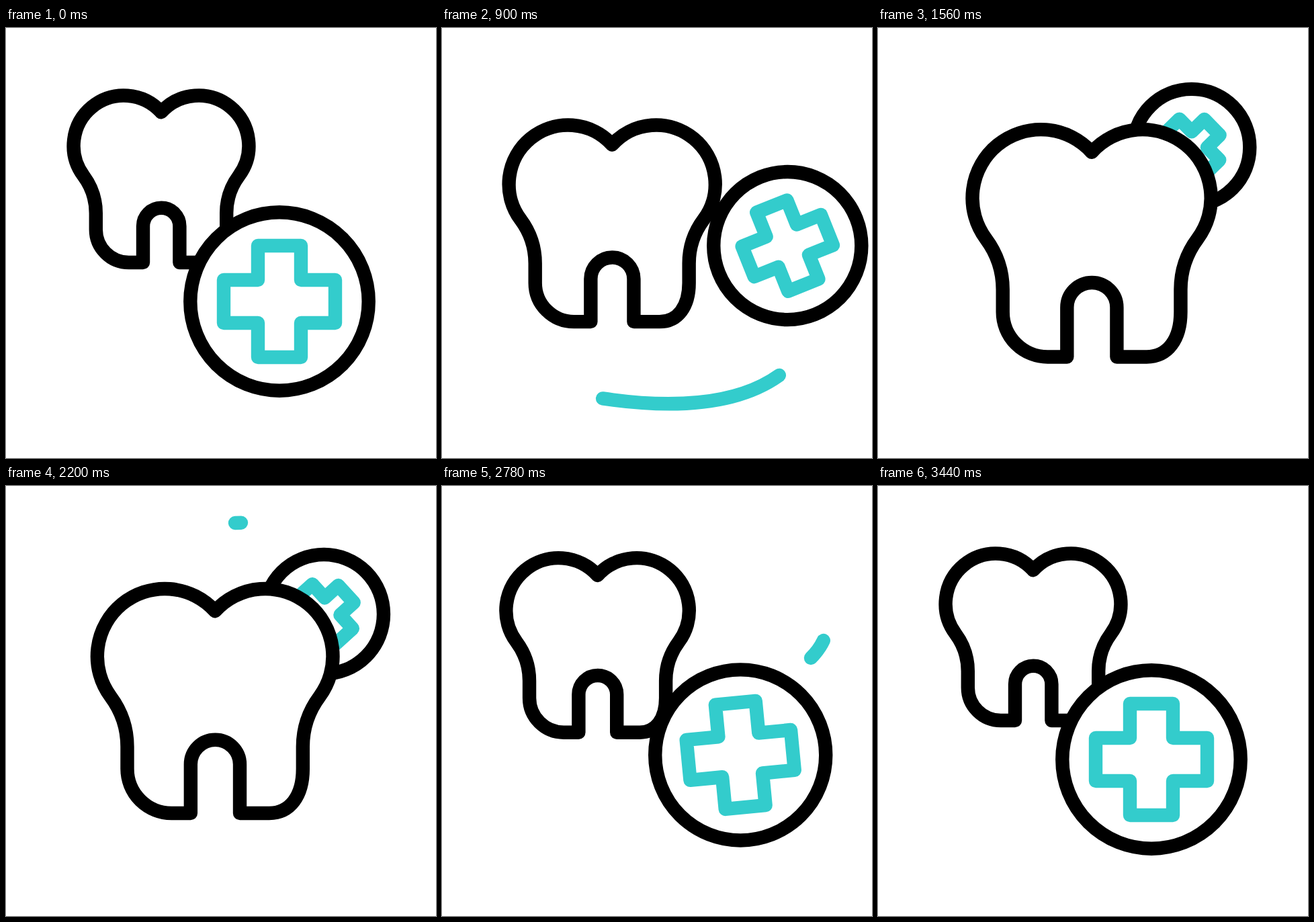
An HTML page for the animation above (3600 ms loop, 640 by 640 pixels).

```html
<!DOCTYPE html>
<html lang="en">
<head>
<meta charset="utf-8">
<title>Dental care</title>
<style>
@property --p { syntax: "<number>"; inherits: true; initial-value: 0; }
@property --lag { syntax: "<number>"; inherits: true; initial-value: 0; }
@property --front { syntax: "<number>"; inherits: true; initial-value: 1; }
@property --head { syntax: "<number>"; inherits: true; initial-value: 0; }
@property --tail { syntax: "<number>"; inherits: true; initial-value: 0; }

html, body { margin: 0; height: 100%; overflow: hidden; background: #fff; }

svg {
  display: block;
  width: 100%;
  height: 100%;
  --pen: 20.4px;
  stroke-linecap: round;
  stroke-linejoin: round;
  animation: swing 3600ms infinite, lag 3600ms step-end infinite, layer 3600ms step-end infinite;
}

/* --p runs 0 to 1 and back; every pose follows from it */
@keyframes swing {
  0% { --p: 0; }
  5% { --p: 0; animation-timing-function: cubic-bezier(.705, 0, .15, 1); }
  50.28% { --p: 1; animation-timing-function: cubic-bezier(.713, 0, .095, 1); }
  95.56%, 100% { --p: 0; }
}
@keyframes lag { 0% { --lag: 0; } 50.28%, 100% { --lag: .47; } }
@keyframes layer { 0% { --front: 1; } 25.5% { --front: 0; } 70.4%, 100% { --front: 1; } }

.move { offset-rotate: 0deg; }
.tooth.move {
  --r: calc(1 - var(--p));
  offset-path: path("M231 224.75 C231 284 270 320.3 320 320.3");
  offset-distance: calc(100% * var(--p) * (1 - var(--lag) * var(--r) * var(--r) * var(--r)));
}
.badge.move {
  offset-path: path("M407 407 C573 390 508 262 465 174");
  offset-distance: calc(100% * var(--p));
}
.front { opacity: var(--front); }
.back { opacity: calc(1 - var(--front)); }

/* shapes change size while the line weight stays */
.size {
  transform: rotate(calc(var(--turn, 0) * var(--p) * 1deg)) scale(var(--s));
  stroke-width: calc(var(--pen) / var(--s));
  stroke: #000;
  fill: #fff;
}
.molar { --s: calc(1 + .3665 * var(--p)); }
.disc { --s: calc(1 - .352 * var(--p)); }
.cross { --s: calc(1 - .493 * var(--p)); --turn: -45; stroke: #3cc; }

.trail {
  fill: none;
  stroke: #3cc;
  stroke-width: var(--pen);
  stroke-dasharray: calc((var(--head) - var(--tail)) * 1px) 300px;
  stroke-dashoffset: calc(var(--tail) * -1px);
  opacity: calc((var(--head) - var(--tail)) * 999);
  animation: 3600ms cubic-bezier(.7, 0, .3, 1) infinite;
}
.low { animation-name: low-head, low-tail; }
.high { animation-name: high-head, high-tail; }
@keyframes low-head { 0%, 14% { --head: 0; } 31.22%, 100% { --head: 100; } }
@keyframes low-tail { 0%, 18.15% { --tail: 0; } 35.37%, 100% { --tail: 100; } }
@keyframes high-head { 0%, 58.19% { --head: 0; } 75.42%, 100% { --head: 100; } }
@keyframes high-tail { 0%, 65% { --tail: 0; } 82.22%, 100% { --tail: 100; } }
</style>
</head>
<body>
<svg viewBox="0 0 640 640">
  <path class="trail low" pathLength="100" d="M139 531 C280 567 482 590 550 462"/>
  <path class="trail high" pathLength="100" d="M341 55 C470 48 639 166 549 256"/>

  <g class="badge move back">
    <circle class="size disc" r="132.7"/>
    <path class="size cross" d="M-32-83H32V-32H83V32H32V83H-32V32H-83V-32H-32Z"/>
  </g>

  <g class="tooth move">
    <g class="size molar">
      <path transform="translate(-231 -224.75)" d="M231 125.3
        A74.8 74.8 0 0 0 115.4 220 A93 93 0 0 1 133.8 276
        V300 A49 49 0 0 0 183 349 H204 V295
        A27.2 27.2 0 0 1 258.4 295 V349 H291
        C314 349 328.2 330 328.2 300 V276
        A93 93 0 0 1 346.6 220 A74.8 74.8 0 0 0 231 125.3 Z"/>
    </g>
  </g>

  <g class="badge move front">
    <circle class="size disc" r="132.7"/>
    <path class="size cross" d="M-32-83H32V-32H83V32H32V83H-32V32H-83V-32H-32Z"/>
  </g>
</svg>
</body>
</html>
```
